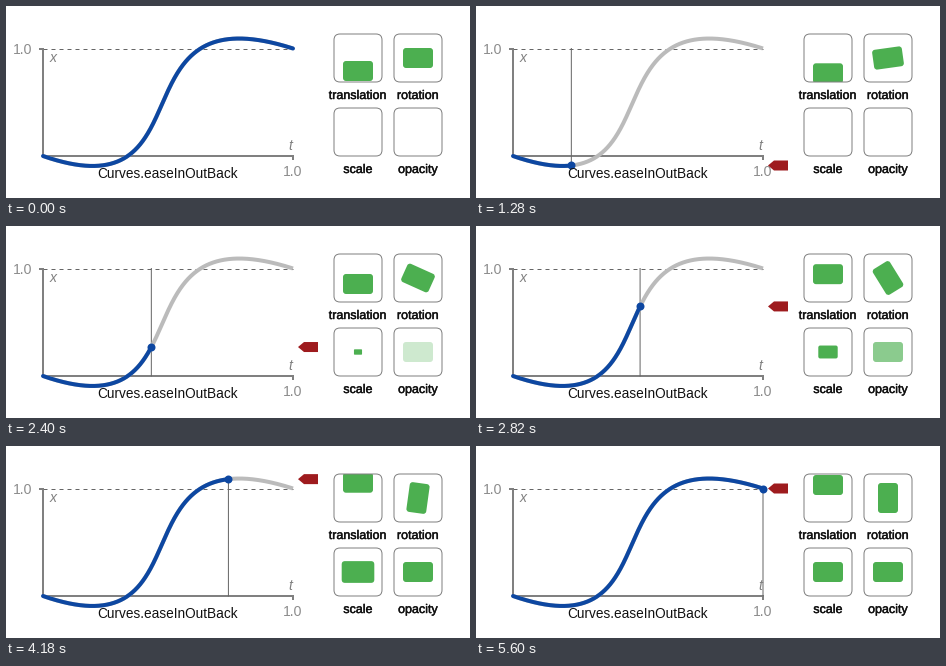
A matplotlib script for the animation above (5.62 s loop, 464 px wide and 192 px high).

```python
import numpy as np
import matplotlib.pyplot as plt
from matplotlib.animation import FuncAnimation
from matplotlib.patches import FancyBboxPatch, Polygon
from matplotlib.patheffects import withStroke
from matplotlib.transforms import Affine2D

W, H, DPI = 464, 192, 64
PX = 72 / DPI
LEFT, RIGHT, TOP, BASE = 37, 287, 42.5, 150
STEPS, TICK_MS, TICKS = 120, 20, 281
BLUE, GREEN, RED = "#0d47a1", "#4caf50", "#9e1b1e"
AXIS, FAINT, THIN = "#808080", "#bbbbbb", "#666666"

plt.rcParams["font.family"] = "Liberation Sans"
fig = plt.figure(figsize=(W / DPI, H / DPI), dpi=DPI, facecolor="white")
ax = fig.add_axes([0, 0, 1, 1])
ax.set(xlim=(0, W), ylim=(H, 0))
ax.axis("off")


def bezier(s, a, b):
    return 3 * (1 - s) ** 2 * s * a + 3 * (1 - s) * s**2 * b + s**3


# easeInOutBack: cubic (0.68, -0.55, 0.265, 1.55)
S = np.linspace(0, 1, 1201)
CURVE_T = bezier(S, 0.68, 0.265)
CURVE_V = bezier(S, -0.55, 1.55)


def to_x(t):
    return LEFT + (RIGHT - LEFT) * t


def to_y(v):
    return BASE + (TOP - BASE) * v


def line(xs, ys, color, width, z, **kw):
    return ax.plot(xs, ys, color=color, lw=width * PX, zorder=z, **kw)[0]


def label(x, y, text, size, color, **kw):
    return ax.text(x, y, text, size=size * PX, color=color, ha="center",
                   va="baseline", zorder=6, **kw)


def rounded(x, y, w, h, r, **kw):
    return ax.add_patch(FancyBboxPatch(
        (x, y), w, h, boxstyle=f"round,pad=0,rounding_size={r}", **kw))


# Axes and captions
line([LEFT, LEFT], [TOP - 1, BASE + 1], AXIS, 2, 2, solid_capstyle="butt")
line([LEFT - 4, LEFT], [TOP, TOP], AXIS, 2, 2, solid_capstyle="butt")
line([LEFT, RIGHT + 1], [BASE, BASE], AXIS, 2, 2, solid_capstyle="butt")
line([RIGHT, RIGHT], [BASE, BASE + 4], AXIS, 2, 2, solid_capstyle="butt")
line([LEFT, RIGHT], [TOP, TOP], THIN, 1, 1, linestyle=(0, (4, 4)))
label(17, 48, "1.0", 14, "#8c8c8c")
label(287, 170, "1.0", 14, "#8c8c8c")
label(47, 56, "x", 14, "#808080", style="italic")
label(284, 144, "t", 14, "#808080", style="italic")
label(162, 172, "Curves.easeInOutBack", 13.65, "#111111")

# Graph
line(to_x(CURVE_T), to_y(CURVE_V), FAINT, 4, 3, solid_capstyle="butt")
trace = line([], [], BLUE, 4, 4, solid_capstyle="round")
guide = line([], [], THIN, 1, 2.5, snap=False)
dot = line([], [], BLUE, 0, 5, marker="o", ms=8 * PX, mew=0)
ARROW = np.array([(292, 0), (298, -5), (312, -5), (312, 5), (298, 5)])
pointer = ax.add_patch(Polygon(ARROW, fc=RED, lw=0, zorder=7))


def sample(cx, cy, name):
    frame = rounded(cx - 24, cy - 24, 48, 48, 6, fc="none", ec=AXIS,
                    lw=PX, zorder=6)
    tile = rounded(-15, -10, 30, 20, 3, fc=GREEN, lw=0, zorder=5)
    tile.set_clip_path(frame)
    label(cx, cy + 41, name, 12.5, "#111111",
          path_effects=[withStroke(linewidth=0.45 * PX, foreground="#111111")])
    return tile


def place(tile, cx, cy, angle=0, scale=1):
    move = Affine2D().scale(scale).rotate_deg(angle).translate(cx, cy)
    tile.set_transform(move + ax.transData)


slide = sample(352, 52, "translation")
spin = sample(412, 52, "rotation")
grow = sample(352, 126, "scale")
fade = sample(412, 126, "opacity")
place(fade, 412, 126)


def step_at(tick):
    # Three steps per 140 ms, held for 20, 100 and 20 ms
    group, rest = divmod(tick, 7)
    return 3 * group + (rest >= 1) + (rest >= 6)


def update(tick):
    step = step_at(tick)
    t = step / STEPS
    v = float(np.interp(t, CURVE_T, CURVE_V))
    x, y = to_x(t), to_y(v)

    running = step > 0
    for part in (guide, dot, pointer):
        part.set_visible(running)
    done = CURVE_T < t if running else CURVE_T <= 1
    end_t, end_v = (t, v) if running else (1, 1)
    trace.set_data(to_x(np.append(CURVE_T[done], end_t)),
                   to_y(np.append(CURVE_V[done], end_v)))
    guide.set_data([x, x], [min(TOP, y), max(BASE, y)])
    dot.set_data([x], [y])
    pointer.set_xy(ARROW + (0, y))

    place(slide, 352, 65 - 26 * v)
    place(spin, 412, 52, angle=90 * v)
    grow.set_visible(v > 0.005)
    place(grow, 352, 126, scale=max(v, 0.005))
    fade.set_alpha(min(max(v, 0), 1))
    return trace, guide, dot, pointer, slide, spin, grow, fade


anim = FuncAnimation(fig, update, frames=TICKS, interval=TICK_MS,
                     repeat=True, repeat_delay=0, blit=False)
plt.show()
```
